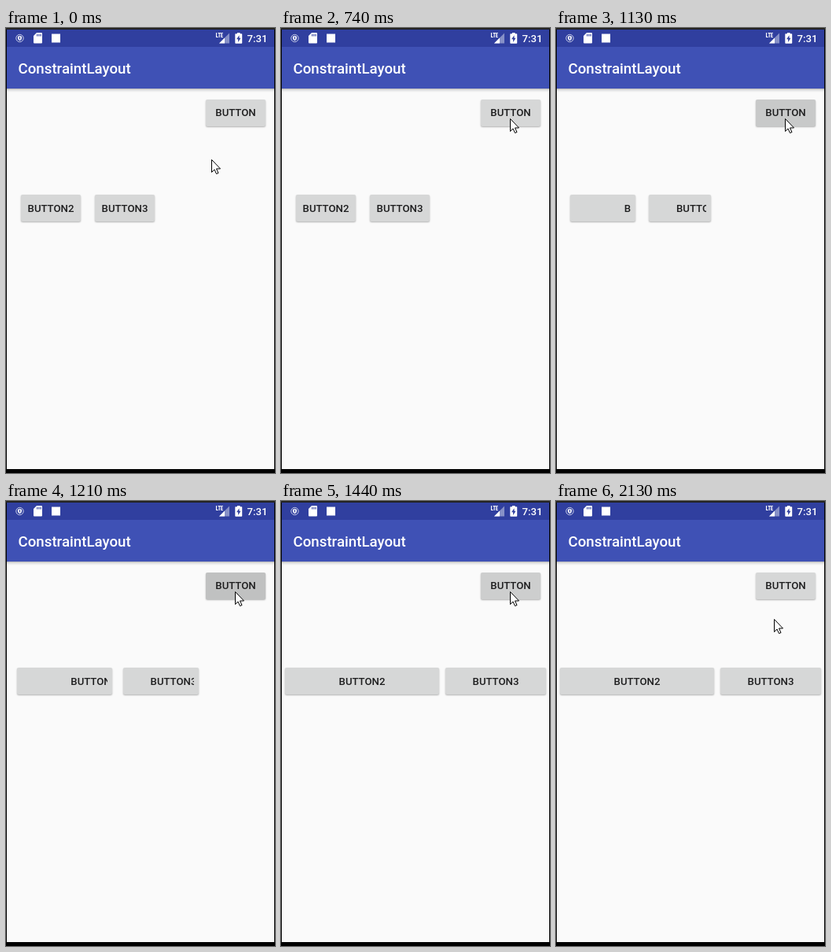
Animation of 342 by 566 pixels, one loop 3.14 s. Source, as an HTML page:

```html
<!DOCTYPE html>
<html lang="en">
<head>
<meta charset="utf-8">
<title>ConstraintLayout</title>
<style>
@property --f { syntax: "<number>"; inherits: true; initial-value: 0; }
@property --g { syntax: "<number>"; inherits: true; initial-value: 0; }

html, body { margin: 0; width: 100%; height: 100%; overflow: hidden; background: #000; }

.stage {
  position: relative; width: 342px; height: 566px; overflow: hidden;
  font: 500 13.2px Roboto, sans-serif;
  animation: spread 3140ms step-end infinite;
}
.chrome, .pointer { position: absolute; left: 0; top: 0; overflow: visible; }

/* --f: progress of the bounds, --g: which layout the label uses */
.btn {
  position: absolute; top: 212px; height: 34px;
  left: calc((var(--x0) + (var(--x1) - var(--x0)) * var(--f)) * 1px);
  width: calc((var(--w0) + (var(--w1) - var(--w0)) * var(--f)) * 1px);
  border-radius: 2px; background: #d6d7d7;
  box-shadow: 0 1px 2px rgba(0, 0, 0, .3);
  color: #1e1e1f; line-height: 35px; text-align: center; white-space: nowrap;
}
.clip { position: absolute; inset: 0 6px; overflow: hidden; }
.label {
  position: absolute; left: -6px; top: 0;
  width: calc((var(--w0) + (var(--w1) - var(--w0)) * var(--g)) * 1px);
}
.b1 {
  --x0: 254; --x1: 254; --w0: 76; --w1: 76;
  top: 91px; line-height: 33px;
  animation: press 3140ms step-end infinite;
}
.b2 { --x0: 19; --x1: 5; --w0: 76; --w1: 196; }
.b3 { --x0: 113; --x1: 209; --w0: 76; --w1: 128; }

.pointer { animation: move 3140ms step-end infinite; }
.ring { animation: click 3140ms step-end infinite; }

@keyframes spread {
  0% { --f: 0; --g: 0; }
  35.98% { --f: .057; --g: 1; }
  38.53% { --f: .375; --g: 1; }
  41.08% { --f: .78; --g: 1; }
  43.31% { --f: .984; --g: 1; }
  45.85%, 100% { --f: 1; --g: 1; }
}
@keyframes press {
  0% { background: #d6d7d7; }
  35.98% { background: #c8c9c9; }
  38.53% { background: #c0c1c1; }
  43.31% { background: #c6c7c7; }
  45.85% { background: #cdcece; }
  60.5%, 100% { background: #d6d7d7; }
}
@keyframes click {
  0% { opacity: 0; }
  28.98% { opacity: 1; }
  33.75%, 100% { opacity: 0; }
}
@keyframes move {
  0% { transform: translate(261px, 167px); }
  2.22% { transform: translate(264px, 162px); }
  3.98% { transform: translate(268px, 154px); }
  5.73% { transform: translate(271px, 149px); }
  13.37% { transform: translate(278px, 140px); }
  15.92% { transform: translate(283px, 131px); }
  18.47% { transform: translate(287px, 123px); }
  21.01% { transform: translate(290px, 118px); }
  23.56% { transform: translate(291px, 115px); }
  60.5% { transform: translate(289px, 122px); }
  63.05% { transform: translate(285px, 133px); }
  65.28% { transform: translate(280px, 144px); }
  67.83%, 100% { transform: translate(277px, 150px); }
}
</style>
</head>
<body>
<div class="stage">
  <svg class="chrome" width="342" height="566">
    <defs>
      <linearGradient id="shade" x2="0" y2="1">
        <stop stop-color="#000" stop-opacity=".27"/>
        <stop offset=".4" stop-color="#000" stop-opacity=".09"/>
        <stop offset="1" stop-color="#000" stop-opacity="0"/>
      </linearGradient>
    </defs>
    <path fill="#232323" d="M0 0h342v2H0z"/>
    <path fill="#fafafa" d="M1 77h340v484H1z"/>
    <path fill="url(#shade)" d="M1 77h340v5H1z"/>
    <path fill="#3f51b5" d="M1 24h340v53H1z"/>
    <path fill="#303f9f" d="M1 2h340v22H1z"/>

    <!-- status icons -->
    <circle cx="17.5" cy="13" r="4.7" fill="none" stroke="#c5cae6"/>
    <path fill="#e8eaf6" d="M17.5 9.8l2.6 1v2.1q0 2.2-2.6 3.4-2.6-1.2-2.6-3.4v-2.1z"/>
    <path fill="#303f9f" d="M17 11.3h1v3h-1z"/>
    <path fill="#fff" d="M39 6h6q1 0 1 1v11.500q0 1-1 1h-9q-1 0-1-1V10z"/>
    <path stroke="#303f9f" stroke-width="1.100" d="M39.700 7.800v2.700M41.900 7.800v2.700M44.100 7.800v2.700"/>
    <path fill="#fff" d="M58 7.500h11v11H58z"/>
    <path fill="none" stroke="#fff" stroke-width="1.100" d="M267.500 6v5.500h2.200M269.500 6.500h3.500M271.200 6.500V12M275.800 6.500h-2v5h2M273.800 9h1.800"/>
    <path fill="#8690c7" d="M284 6.500v13h-13z"/>
    <path fill="#fff" d="M278 12.500v7h-7z"/>
    <path fill="#fff" d="M294 6h3.500v1.300h2q.7 0 .7.7v11q0 .8-.8.800h-7.300q-.8 0-.8-.8V8q0-.7.7-.7h2z"/>
    <path fill="#303f9f" d="M296.500 9.200v3.500h2l-3.400 5.300v-3.700h-2z"/>

    <g fill="#fff">
      <text x="306.500" y="17.500">7:31</text>
      <text x="15.500" y="58" font-size="18.700">ConstraintLayout</text>
    </g>
  </svg>

  <div class="btn b1"><div class="clip"><div class="label">BUTTON</div></div></div>
  <div class="btn b2"><div class="clip"><div class="label">BUTTON2</div></div></div>
  <div class="btn b3"><div class="clip"><div class="label">BUTTON3</div></div></div>

  <svg class="pointer" width="13" height="20">
    <path fill="#fff" stroke="#000" d="M.5.5v16L4 13l2.500 5.500 2.500-1L6.500 12h5z"/>
    <g class="ring" fill="none">
      <circle cx=".5" cy=".5" r="11.500" stroke="#000"/>
      <circle cx=".5" cy=".5" r="10.500" stroke="#fff"/>
    </g>
  </svg>
</div>
</body>
</html>
```
